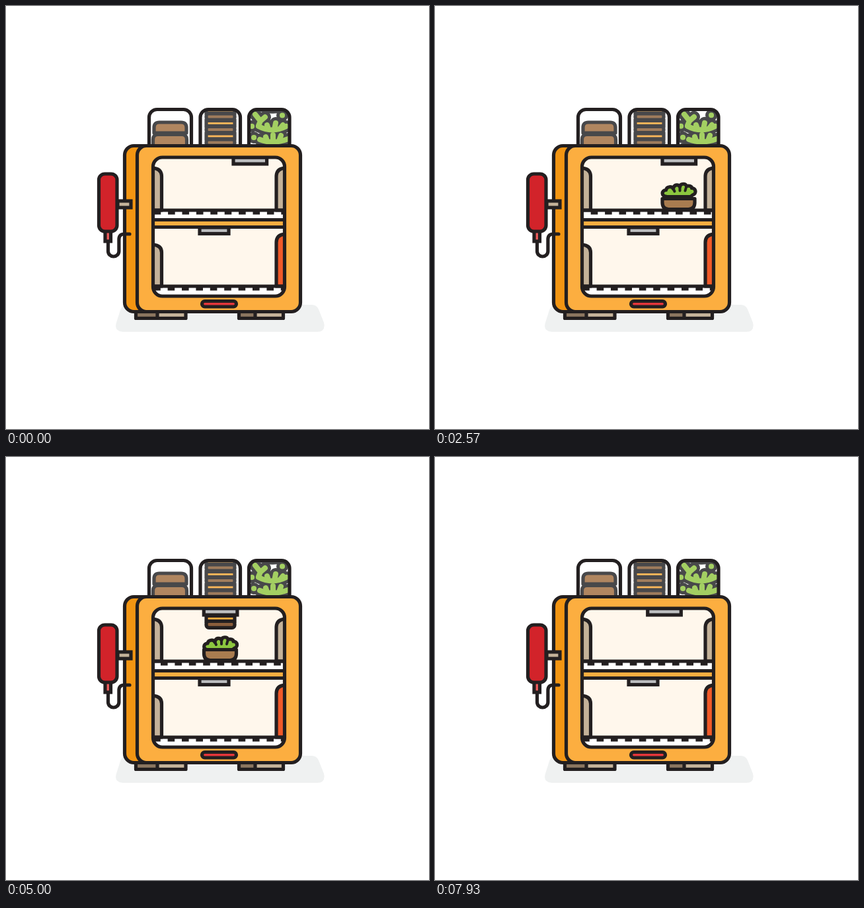
Write an HTML page that moves like this. It is 640 by 640 pixels and loops after 8 s.

```html
<!DOCTYPE html>
<html lang="en">
<head>
<meta charset="utf-8">
<title>Burger machine</title>
<style>
html, body { margin: 0; width: 100%; height: 100%; overflow: hidden; background: #fff; }
svg { display: block; width: 100vw; height: 100vh; }
.ink { stroke: #231f20; stroke-width: 5.2; stroke-linejoin: round; stroke-linecap: round; }
.square { stroke-linejoin: miter; }
.stock { stroke: #48484a; }
.none { fill: none; }
</style>
</head>
<body>
<svg viewBox="0 0 640 640">
  <defs>
    <clipPath id="window"><rect x="222.500" y="229" width="199" height="210" rx="14"/></clipPath>
    <clipPath id="jar2"><path d="M294 211V168.500a12 12 0 0 1 12-12h36.500a12 12 0 0 1 12 12V211z"/></clipPath>
    <clipPath id="jar3"><path d="M367.500 211V168.500a12 12 0 0 1 12-12H417a12 12 0 0 1 12 12V211z"/></clipPath>
    <g id="pair" class="ink stock square">
      <rect x="303" y="173.500" width="43" height="8" fill="#fbb85a"/>
      <rect x="303" y="182.500" width="43" height="9" rx="3.500" fill="#a07c5c"/>
    </g>
    <g id="sprigs" fill="none" stroke-linecap="round" stroke-linejoin="round">
      <path d="M377 164L385 174M392 168L385 174L382 181M418 165.500h.1M375 199h.1M372 182h.1"/>
      <path d="M382 182Q403 193 424 182M397 186L395 180M406 187L408 177M415 185L419 180"/>
      <path d="M384 202Q404 210 427 201M395 204L393 198M404 205V195M413 204L416 196"/>
    </g>
  </defs>

  <path fill="#eff1f1" d="M184 452H462Q470 452 473 459L481 479Q484 493 471 493H177Q163 492 167 479L173 460Q176 452 184 452Z"/>

  <!-- feet -->
  <g class="square">
    <path fill="#8a755f" d="M196.500 461H229V473H196.500zM352.500 461H377V473H352.500z"/>
    <path fill="#c4b299" d="M229 461H272V473H229zM377 461H419.500V473H377z"/>
    <path class="ink none" d="M196.500 461H272V472.500H196.500zM229 461V472M352.500 461H419.500V472.500H352.500zM377 461V472"/>
  </g>

  <!-- jars -->
  <g class="ink stock" fill="#b08660">
    <path d="M224 192V184Q224 176 232 176H265Q273 176 273 184V192Z"/>
    <path d="M222.500 212V202Q222.500 194.500 230 194.500H266Q273.500 194.500 273.500 202V212Z"/>
  </g>
  <g clip-path="url(#jar2)"><g id="stack">
    <use href="#pair" y="-19.500"/><use href="#pair"/><use href="#pair" y="19.500"/>
  </g></g>
  <g clip-path="url(#jar3)"><g id="greens">
    <g stroke="#48484a" stroke-width="18"><use href="#sprigs"/><use href="#sprigs" y="-52"/></g>
    <g stroke="#a3cf62" stroke-width="8"><use href="#sprigs"/><use href="#sprigs" y="-52"/></g>
  </g></g>
  <g class="ink none">
    <path id="jar" d="M216.500 211V168.500a12 12 0 0 1 12-12H268.500a12 12 0 0 1 12 12V211"/>
    <path d="M294 211V168.500a12 12 0 0 1 12-12h36.500a12 12 0 0 1 12 12V211"/>
    <path d="M367.500 211V168.500a12 12 0 0 1 12-12H417a12 12 0 0 1 12 12V211"/>
  </g>

  <!-- body -->
  <rect class="ink" x="179.500" y="211.500" width="80" height="251" rx="14" fill="#f39512"/>
  <rect class="ink" x="198.500" y="211.500" width="247" height="251" rx="14" fill="#fcae40"/>
  <rect x="222.500" y="229" width="199" height="210" rx="14" fill="#fff7ec"/>

  <g clip-path="url(#window)">
    <path fill="#fff" d="M222 309H422V323H222zM222 424H422V440H222z"/>
    <g class="ink" fill="#c4b299">
      <path d="M220 245Q235.500 245 235.500 258V309H220z"/>
      <path d="M424 245Q409 245 409 258V309H424z"/>
      <path d="M220 361Q235.500 361 235.500 373V424H220z"/>
      <path fill="#f15a29" d="M424 345Q409 345 409 358V424H424z"/>
    </g>
    <rect class="ink" x="215" y="323.500" width="215" height="11" fill="#fcae40"/>
    <rect class="ink square" x="293" y="335" width="44" height="9.500" fill="#bcbec0"/>
    <path class="ink" d="M220 309H425M220 424H425"/>
    <g fill="#231f20"><g id="belt"></g><g id="floor"></g></g>

    <g id="burger">
      <g id="patty" class="ink square">
        <rect x="-21.500" y="272" width="43" height="10" rx="4" fill="#8b5e3c"/>
        <rect x="-21.500" y="264" width="43" height="8" fill="#fcae40"/>
        <path id="drips" fill="#fcae40" stroke="none" d="M-14 0H-2L-8 5zM2 0H14L8 5z"/>
      </g>
      <g id="salad" class="ink" fill="#8cc63f">
        <path d="M-17 292C-27 292-26 282-19 282C-18 276-10 276-8 280C-7 273 0 273 2 277C3 271 11 272 12 276C16 275 20 276 20 279C27 279 27 288 22 289L18 292Z"/>
        <path class="none" stroke-width="4" d="M-8 280L-6 284M2 277V283M12 276L10 283"/>
      </g>
      <path class="ink" fill="#a97c50" d="M-24.500 291.500H24.500V298Q24 307.500 15 307.500H-15Q-24 307.500-24.500 298Z"/>
    </g>
    <rect id="nozzle" class="ink square" x="-25.300" y="229" width="50.600" height="10" fill="#bcbec0"/>
  </g>
  <rect class="ink none" x="222.500" y="229" width="199" height="210" rx="14"/>
  <rect class="ink" x="296.500" y="446.500" width="52" height="8.500" rx="4.200" fill="#e5363b"/>

  <!-- sauce bottle -->
  <g class="ink">
    <rect class="square" x="169" y="295" width="20" height="10" fill="#c4b299"/>
    <rect class="square" x="150" y="340" width="8.500" height="16" fill="#ef5b5b"/>
    <rect x="140.500" y="254" width="27.500" height="87" rx="9" fill="#d2232a"/>
    <path class="none" d="M154.500 358V371a8.200 8 0 0 0 16.400 0V353Q171 345 179 345H187"/>
  </g>
</svg>
<script>
const LOOP = 8000, PITCH = 21.4;
const el = id => document.getElementById(id);
const part = Object.fromEntries(
  ['belt', 'floor', 'burger', 'patty', 'drips', 'salad', 'nozzle', 'stack', 'greens'].map(id => [id, el(id)]));

const span = (t, from, to) => Math.min(1, Math.max(0, (t - from) / (to - from)));
const sine = u => (1 - Math.cos(Math.PI * u)) / 2;
const ease = (t, from, to) => sine(span(t, from, to));
const move = (node, x, y, extra = '') =>
  node.setAttribute('transform', `translate(${x.toFixed(2)} ${y.toFixed(2)})${extra}`);
const show = (node, on) => node.setAttribute('visibility', on ? 'visible' : 'hidden');

function teeth(group, y) {
  let d = '';
  for (let i = -1; i < 11; i++) d += `M${(i * PITCH).toFixed(1)} ${y}h10.600v6.500h-10.600z`;
  group.innerHTML = `<path d="${d}"/>`;
}
teeth(part.belt, 309);
teeth(part.floor, 424);
move(part.floor, 223.2, 0);

function draw(t) {
  const x = 463.5 - 95 * ease(t, 0, 1820)
    - 44.5 * sine(Math.pow(span(t, 2800, 4640), 0.795))
    - 170 * ease(t, 6560, 8560);
  const phase = (((x - 324 + 234 - 212) % PITCH) + PITCH) % PITCH;
  move(part.belt, 212 + phase, 0);
  move(part.burger, x, 0);

  const nozzle = 369.3 - 44.7 * ease(t, 2800, 4640) + 44.7 * ease(t, 7430, 8430);
  move(part.nozzle, nozzle, 0);

  // lettuce station
  move(part.greens, 0, t < 2600 ? 52 * ease(t, 1790, 2600) : 0);
  const squash = 1 - 0.2 * ease(t, 5350, 5900);
  move(part.salad, 0, -62 * (1 - ease(t, 1800, 2710)), ` translate(0 291) scale(1 ${squash}) translate(0 -291)`);
  show(part.salad, t > 1800);

  // patty station
  move(part.stack, 0, t < 4900 ? 19.5 * ease(t, 4400, 4900) : 0);
  move(part.patty, 0.5, -46 * (1 - ease(t, 4520, 5500)));
  show(part.patty, t > 4520);
  move(part.drips, 0, 270, ` scale(1 ${1.4 * ease(t, 5430, 6000)})`);
}

const start = performance.now();
function tick() {
  draw((performance.now() - start) % LOOP);
  requestAnimationFrame(tick);
}
draw(0);
requestAnimationFrame(tick);
</script>
</body>
</html>
```
